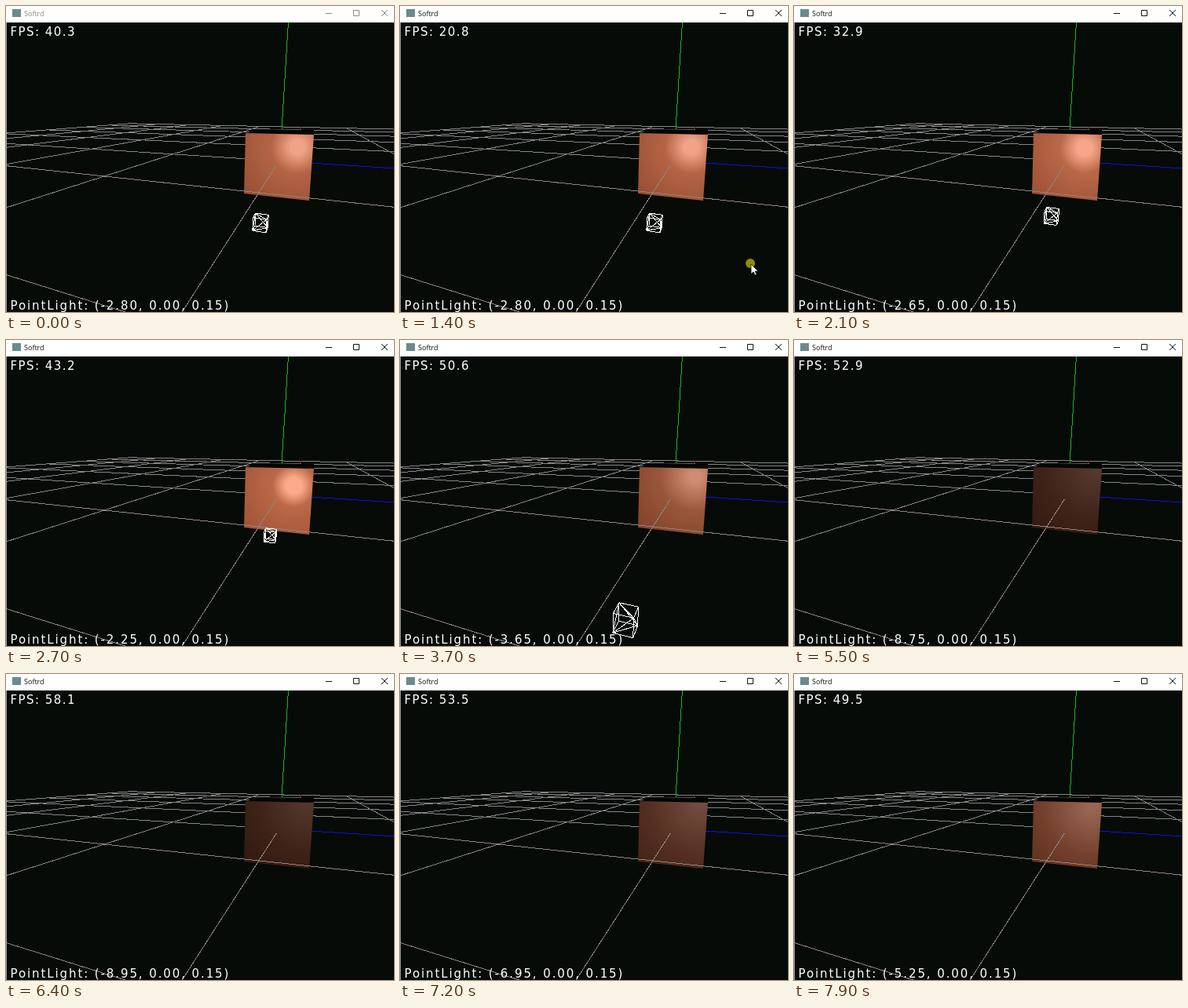
An HTML page that plays this animation: 494 px wide and 390 px high, repeating every 8000 ms.

```html
<!DOCTYPE html>
<html lang="en">
<head>
<meta charset="utf-8">
<title>Softrd</title>
<style>
  html, body { margin: 0; width: 100%; height: 100%; overflow: hidden; background: #070b08; }
  svg { display: block; width: 494px; height: 390px; }
  .hud { font: 15px "DejaVu Sans", sans-serif; fill: #fff; white-space: pre; }
  .title { font: 9px "Open Sans", "Noto Sans", sans-serif; }
  .crisp { shape-rendering: crispEdges; fill: none; }
</style>
</head>
<body>
<svg viewBox="0 0 494 390">
  <defs>
    <radialGradient id="glow" gradientUnits="userSpaceOnUse" r="130">
      <stop offset="0"/><stop/><stop/><stop offset="1"/>
    </radialGradient>
  </defs>
  <rect width="494" height="390" fill="#070b08"/>
  <path id="grid" class="crisp" stroke="#858585"/>
  <path id="red" class="crisp" stroke="#a01818"/>
  <path id="blue" class="crisp" stroke="#1010d0"/>
  <path class="crisp" stroke="#18b818" d="M348.5 198L359.5 20"/>
  <path fill="#050504" d="M305 162L320 157L392 158V164Z"/>
  <path fill="url(#glow)" d="M305 162L392 164L386 248L303 239Z"/>
  <path id="front" class="crisp" stroke="#8d8580"/>
  <path id="lamp" class="crisp" stroke="#fff"/>
  <text id="fps" class="hud" x="5.5" y="38" letter-spacing="1.45"></text>
  <text id="pos" class="hud" x="5.5" y="387" letter-spacing="1.9"></text>
  <rect y="21" width="1" height="369" fill="#999"/>
  <rect width="494" height="21" fill="#fff"/>
  <rect x="8" y="4" width="11" height="10" fill="#6b8a8c"/>
  <g id="bar">
    <text class="title" x="23" y="12.5" fill="currentColor">Softrd</text>
    <path fill="none" stroke="currentColor" d="M407 9.5h8M442.5 5.5h7v7h-7zM478 5l8 8M486 5l-8 8"/>
  </g>
  <g id="mouse">
    <circle id="press" cx="-1" cy="-1" r="6" fill="#fff000" fill-opacity=".56"/>
    <path d="M0 0V12.5L3 9.8L5 14.2L7 13.3L5.1 9H9Z" fill="#fff" stroke="#000" stroke-width=".7"/>
  </g>
</svg>
<script>
const LOOP = 8000, TICK = 100;
const $ = id => document.getElementById(id);
const stops = [...document.querySelectorAll('stop')];

// [ms, value]: distance of the light along -x, and the frame rate
const LIGHT = [[1900, 2.8], [2700, 2.25], [3000, 1.7], [5960, 10.02], [8000, 5]];
const RATE = [[0, 40.3], [1400, 20.8], [2700, 43.2], [3700, 50.6], [4600, 47.6], [6400, 58.1], [7900, 49.5]];

function track(keys, t) {
  let i = 1;
  while (i < keys.length - 1 && t > keys[i][0]) i++;
  const [t0, a] = keys[i - 1], [t1, b] = keys[i];
  return a + (b - a) * Math.min(1, Math.max(0, (t - t0) / (t1 - t0)));
}

// homogeneous projection of a world point
const project = ([x, y, z]) => [
  1823 + 390 * x - 53 * y + 269 * z,
  1035 + 132 * x - 450 * y - 52.8 * z,
  5.24 + x - 0.22 * y - 0.4 * z
];

function seg(a, b) {
  let p = project(a), q = project(b);
  const near = 0.15;
  if (p[2] < near && q[2] < near) return '';
  const cut = (u, v) => {
    const k = (near - u[2]) / (v[2] - u[2]);
    return u.map((n, i) => n + (v[i] - n) * k);
  };
  if (p[2] < near) p = cut(p, q);
  else if (q[2] < near) q = cut(q, p);
  const at = v => (v[0] / v[2]).toFixed(1) + ' ' + (v[1] / v[2]).toFixed(1);
  return 'M' + at(p) + 'L' + at(q);
}

function drawGrid() {
  let back = '', front = seg([-10, 0, 0], [-0.4, 0, 0]);
  for (let k = -10; k <= 10; k += 2) {
    if (k) back += seg([-10, 0, k], [10, 0, k]);
    const line = seg([k, 0, -10], [k, 0, k ? 10 : 0]);
    if (k < 0) front += line; else back += line;
  }
  $('grid').setAttribute('d', back);
  $('front').setAttribute('d', front);
  $('red').setAttribute('d', seg([0, 0, 0], [10, 0, 0]));
  $('blue').setAttribute('d', seg([0, 0, 0], [0, 0, 10]));
}

// cube edges, plus one diagonal per face between corners with an even bit count
function lampPath(d) {
  const h = 0.05;
  const corner = i => [-d + (i & 1 ? h : -h), i & 2 ? h : -h, 0.15 + (i & 4 ? h : -h)];
  const bits = n => (n & 1) + (n >> 1 & 1) + (n >> 2);
  if (project(corner(0))[2] < 0.35) return '';
  let path = '';
  for (let i = 0; i < 8; i++)
    for (let j = i + 1; j < 8; j++) {
      const n = bits(i ^ j);
      if (n === 1 || (n === 2 && bits(i) % 2 === 0)) path += seg(corner(i), corner(j));
    }
  return path;
}

function shade(d) {
  const power = Math.min(1.04, 1.503 / (1 + 0.09 * d + 0.032 * d * d));
  const rgb = c => `rgb(${c.map(v => Math.round(v * power))})`;
  const hi = [240, 163, 133], mid = [180, 100, 69], low = [128, 63, 37];
  [hi, hi, mid, low].forEach((c, i) => stops[i].setAttribute('stop-color', rgb(c)));
  const spread = d / 2.8;
  stops[1].setAttribute('offset', Math.max(0.02, 0.12 - 0.05 * spread));
  stops[2].setAttribute('offset', Math.min(0.5, 0.26 * spread));
  $('glow').setAttribute('cx', 390 - 53 / d);
  $('glow').setAttribute('cy', 156 + 67 / d);
}

function drawMouse(t) {
  const away = Math.max(0, Math.abs(t - 1450) - 150) / 300;
  $('mouse').style.display = away < 1.2 ? '' : 'none';
  $('press').style.display = away ? 'none' : '';
  $('mouse').setAttribute('transform', `translate(${447 + 47 * away} ${329 + 30 * away})`);
}

function draw(time) {
  let t = Math.floor((time % LOOP) / TICK) * TICK;
  if (t < 900) t = 0;
  const d = Math.round(track(LIGHT, t) * 20) / 20;
  shade(d);
  $('lamp').setAttribute('d', lampPath(d));
  $('fps').textContent = 'FPS: ' + track(RATE, t).toFixed(1);
  $('pos').textContent = `PointLight: (-${d.toFixed(2)}, 0.00, 0.15)`;
  $('bar').setAttribute('color', t < 1300 ? '#888' : '#111');
  drawMouse(t);
}

drawGrid();
const start = performance.now();
function frame() {
  draw(performance.now() - start);
  requestAnimationFrame(frame);
}
frame();
</script>
</body>
</html>
```
